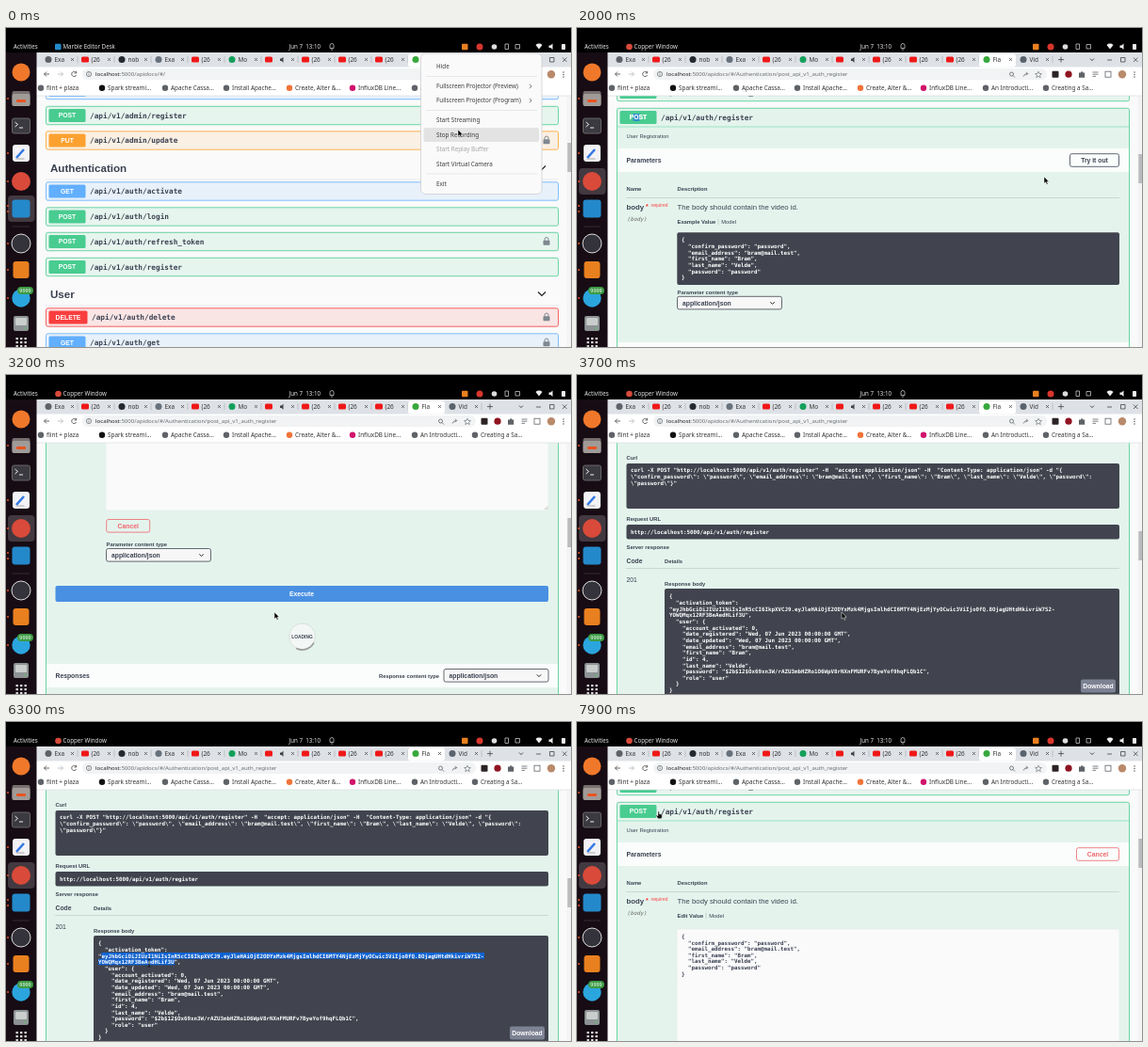
Animation of 600x339 px, one loop 8 s. Source, as an HTML page:

```html
<!DOCTYPE html>
<html lang="en">
<head>
<meta charset="utf-8">
<title>API docs walkthrough</title>
<style>
html, body { margin: 0; width: 100%; height: 100%; overflow: hidden; background: #000; }
svg { display: block; width: 100vw; height: 100vh; }
text { white-space: pre; font-family: "Liberation Sans", Arial, sans-serif; }
.ui { font-family: "Noto Sans", "Open Sans", sans-serif; }
.mono { font-family: "DejaVu Sans Mono", monospace; }
.b { font-weight: 700; }
.m { font-weight: 500; }
.i { font-style: italic; }
.mid { text-anchor: middle; }

/* 1.25% of the loop is 100 ms */
.anim { animation: 8s step-end -20ms infinite; }
#menu, .first { animation-name: first; }
.later { animation-name: later; }
.closed { animation-name: closed; }
.open { animation-name: open; }
.view { animation-name: view; }
.edit { animation-name: edit; }
.load { animation-name: load; }
.done { animation-name: done; }
#picked { animation-name: picked; }
#reply { animation-name: reply; }
#doc { animation-name: scroll; animation-timing-function: steps(5); }
#thumb { animation-name: thumb; animation-timing-function: steps(5); }
#mouse { animation-name: mouse; animation-timing-function: steps(5); }
#arrow { animation-name: arrow; }
#beam { animation-name: beam; }
#hand { animation-name: hand; }
#ring { animation-name: spin; animation-duration: 1s; animation-timing-function: steps(10); }
.sel { transform-box: fill-box; transform-origin: right; }
#sel1 { animation-name: sel1; animation-timing-function: steps(3); }
#sel2 { animation-name: sel2; animation-timing-function: steps(2); }

@keyframes first { 0% { opacity: 1 } 1.25%, 100% { opacity: 0 } }
@keyframes later { 0% { opacity: 0 } 1.25%, 100% { opacity: 1 } }
@keyframes closed { 0% { opacity: 1 } 7.5%, 100% { opacity: 0 } }
@keyframes open { 0% { opacity: 0 } 7.5%, 100% { opacity: 1 } }
@keyframes view { 0% { opacity: 0 } 7.5% { opacity: 1 } 28.75%, 100% { opacity: 0 } }
@keyframes edit { 0% { opacity: 0 } 28.75%, 100% { opacity: 1 } }
@keyframes load { 0% { opacity: 0 } 37.5% { opacity: 1 } 42.5%, 100% { opacity: 0 } }
@keyframes done { 0% { opacity: 0 } 42.5%, 100% { opacity: 1 } }
@keyframes picked { 0% { opacity: 0 } 7.5% { opacity: 1 } 57.5%, 100% { opacity: 0 } }
@keyframes reply { 0% { transform: none } 37.5% { transform: translateY(46px) } 42.5%, 100% { transform: none } }
@keyframes arrow {
  0% { opacity: 1 } 6.25% { opacity: 0 } 8.75% { opacity: 1 } 27.5% { opacity: 0 } 30% { opacity: 1 }
  55% { opacity: 0 } 87.5% { opacity: 1 } 95%, 100% { opacity: 0 }
}
@keyframes beam { 0% { opacity: 0 } 55% { opacity: 1 } 87.5%, 100% { opacity: 0 } }
@keyframes hand {
  0% { opacity: 0 } 6.25% { opacity: 1 } 8.75% { opacity: 0 } 27.5% { opacity: 1 } 30% { opacity: 0 }
  95%, 100% { opacity: 1 }
}
@keyframes spin { to { transform: rotate(360deg) } }
@keyframes sel1 {
  0%, 59.9% { transform: scaleX(0) }
  60% { transform: scaleX(.8) }
  63.75%, 100% { transform: none }
}
@keyframes sel2 { 0%, 57.5% { transform: scaleX(0) } 60%, 100% { transform: none } }
@keyframes scroll {
  0%, 7.5% { transform: translateY(0) }
  13.75%, 16.25% { transform: translateY(-58px) }
  22.5%, 30% { transform: translateY(-159px) }
  36.25%, 40% { transform: translateY(-370px) }
  46.25%, 88.75% { transform: translateY(-585px) }
  95%, 100% { transform: translateY(-159px) }
}
@keyframes thumb {
  0%, 7.5% { transform: translateY(122px) }
  13.75%, 16.25% { transform: translateY(123px) }
  22.5%, 30% { transform: translateY(134px) }
  36.25%, 40% { transform: translateY(152px) }
  46.25%, 88.75% { transform: translateY(166px) }
  95%, 100% { transform: translateY(124px) }
}
@keyframes mouse {
  0%, 1.25% { transform: translate(480px, 108px) }
  6.25%, 8.75% { transform: translate(66px, 253px) }
  13.75%, 18.75% { transform: translate(340px, 188px) }
  25% { transform: translate(496px, 158px) }
  27.5%, 30% { transform: translate(545px, 140px) }
  36.25%, 37.5% { transform: translate(300px, 230px) }
  40% { transform: translate(285px, 252px) }
  46.25%, 50% { transform: translate(281px, 252px) }
  56.25%, 57.5% { transform: translate(182px, 255px) }
  63.75%, 66.25% { transform: translate(101px, 249px) }
  76.25%, 87.5% { transform: translate(152px, 256px) }
  96.25%, 100% { transform: translate(86px, 95px) }
}
</style>
</head>
<body>
<svg viewBox="0 0 600 339" preserveAspectRatio="none">
  <rect width="600" height="339" fill="#fafafa"/>
  <g id="doc" class="anim"></g>
  <g id="browser"></g>
  <g id="desktop"></g>
  <g id="menu" class="anim"></g>
  <g id="mouse" class="anim">
    <path id="arrow" class="anim" d="M0 0V7.2L1.7 5.7L2.9 8.3L4.1 7.7L3 5.2H5.2Z" fill="#000" stroke="#fff" stroke-width=".5"/>
    <path id="beam" class="anim" d="M-1.5 -4H1.5M0 -4V4M-1.5 4H1.5" stroke="#111" stroke-width=".8"/>
    <path id="hand" class="anim" d="M0 0h1.3v2.6l3 .7v2.6l-.8 1.8H0L-2 4.6l.6 -.7L0 4.7Z" fill="#111" stroke="#fff" stroke-width=".4"/>
  </g>
</svg>
<script>
const INK = '#3b4151', GREEN = '#49cc90', DARK = '#41444e', CANCEL = '#f0646a';
const COLORS = { GET: '#61affe', POST: GREEN, PUT: '#fca130', DELETE: '#f93e3e' };

// y is the vertical middle of the text
const text = (x, y, s, size, cls = '', fill = INK) =>
  `<text x="${x}" y="${y + size * .36}" font-size="${size}" class="${cls}" fill="${fill}">${s}</text>`;
const box = (x, y, w, h, fill, more = '') =>
  `<rect x="${x}" y="${y}" width="${w}" height="${h}" fill="${fill}" ${more}/>`;
const dot = (x, y, r, fill, more = '') => `<circle cx="${x}" cy="${y}" r="${r}" fill="${fill}" ${more}/>`;
const line = (d, color = INK, w = .8) => `<path d="${d}" fill="none" stroke="${color}" stroke-width="${w}"/>`;
const group = (cls, body, dy = 0) => `<g transform="translate(0 ${dy})"><g class="anim ${cls}">${body}</g></g>`;
const put = (id, ...parts) => { document.getElementById(id).innerHTML = parts.join(''); };

const lock = y => box(570.5, y - 1.2, 7, 5, '#7f8790', 'rx=".8"') + line(`M572 ${y - 1}V${y - 2.5}a2 2 0 0 1 4 0V${y - 1}`, '#7f8790', 1);
const chevron = (x, y, s = 4, w = 1.2) => line(`M${x - s} ${y - s / 2}L${x} ${y + s / 2}L${x + s} ${y - s / 2}`, '#222', w);

function opHead(y, method, path, locked) {
  const wide = method === 'DELETE' ? 41 : 39;
  return box(45.5, y - 7, wide, 14, COLORS[method], 'rx="1.5"')
    + text(45.5 + wide / 2, y, method, 6.8, 'b mid', '#fff')
    + text(wide + 50, y, path, 7.76, 'mono b') + (locked ? lock(y) : '');
}
function row(y, method, path, locked) {
  const c = COLORS[method];
  return box(42.5, y - 9.7, 544, 19.4, c, `fill-opacity=".11" stroke="${c}" stroke-width=".8" rx="2"`) + opHead(y, method, path, locked);
}
const heading = (y, s) => text(47, y, s, 11.6, 'b') + chevron(569, y)
  + line(`M42 ${y + 12.5}H587`, '#d8dade', .5);
const button = (x, y, w, s, color) =>
  box(x, y, w, 13.6, 'none', `rx="2" stroke="${color}" stroke-width=".8"`) + text(x + w / 2, y + 6.8, s, 6.8, 'b mid', color);
const select = (x, y) => box(x, y, 111, 13.6, '#f7f7f7', `rx="2" stroke="${DARK}" stroke-width=".8"`)
  + text(x + 5.5, y + 6.8, 'application/json', 6.8, 'b') + chevron(x + 101, y + 7, 2.2, 1);
const responses = y => box(43, y, 543, 25, '#fff', 'fill-opacity=".8"') + text(52.5, y + 12.5, 'Responses', 6.8, 'b')
  + text(396, y + 12.5, 'Response content type', 5.82, 'b') + select(465, y + 5.5);
const code = (x, y, lines, fill = '#fff') =>
  lines.map((s, i) => text(x, y + i * 6.65, s, 5.82, 'mono b', fill)).join('');
const panel = (x, y, w, h) => box(x, y, w, h, DARK, 'rx="2"');
const valueTabs = (name, x) => text(106.5, 206, name, 5.82, 'b')
  + line(`M${x} 203V209`, '#999', .4) + text(x + 3.2, 206, 'Model', 5.82);

const sample = ['{', '  "confirm_password": "password",', '  "email_address": "bram@mail.test",',
  '  "first_name": "Bram",', '  "last_name": "Velde",', '  "password": "password"', '}'];
const curl = ['curl -X POST "http://localhost:5000/api/v1/auth/register" -H  "accept: application/json" -H  "Content-Type: application/json" -d "{',
  '\\"confirm_password\\": \\"password\\", \\"email_address\\": \\"bram@mail.test\\", \\"first_name\\": \\"Bram\\", \\"last_name\\": \\"Velde\\", \\"password\\":',
  '\\"password\\"}"'];
const answer = ['{', '  "activation_token":',
  '"eyJhbGciOiJIUzI1NiIsInR5cCI6IkpXVCJ9.eyJleHAiOjE2ODYxMzk4MjgsImlhdCI6MTY4NjEzMjYyOCwic3ViIjo0fQ.8OjagUHtdHkivriW7S2-',
  'YOWQMqx12RF3BeAedHLif3U",', '  "user": {', '    "account_activated": 0,',
  '    "date_registered": "Wed, 07 Jun 2023 00:00:00 GMT",', '    "date_updated": "Wed, 07 Jun 2023 00:00:00 GMT",',
  '    "email_address": "bram@mail.test",', '    "first_name": "Bram",', '    "id": 4,', '    "last_name": "Velde",',
  '    "password": "$2b$12$Ox69xn3W/rAZU3mbHZRo1O6WpV8rNXnFMURFv7ByeYof9hqFLQb1C",',
  '    "role": "user"', '  }', '}'];

const registerBlock =
  box(42.5, 85.3, 544, 800, GREEN, `fill-opacity=".12" stroke="${GREEN}" stroke-width=".8" rx="2"`)
  + opHead(95, 'POST', '/api/v1/auth/register')
  + `<g id="picked" class="anim">${box(59.5, 91, 7, 8, '#2f7de0', 'fill-opacity=".75"')}${text(65, 95, 'POST', 6.8, 'b mid', '#fff')}</g>`
  + line('M43 105H586', GREEN, .5)
  + text(52.5, 115.3, 'User Registration', 5.82)
  + box(43, 128, 543, 25, '#fff', 'fill-opacity=".8"') + text(52.5, 140.5, 'Parameters', 6.8, 'b')
  + text(52.5, 171, 'Name', 5.82, 'b') + text(106.5, 171, 'Description', 5.82, 'b')
  + line('M52 180.5H576', '#b5c4bf', .6)
  + text(52.5, 190, 'body', 7.76, 'b') + text(73, 189.5, '*', 7, 'b', '#f33') + text(78.5, 188.5, 'required', 4.9, '', '#f44')
  + text(53.5, 203, '(body)', 5.82, 'mono i', '#666')
  + text(106.5, 190, 'The body should contain the video id.', 7.76);

const viewBlock = button(523.5, 133.7, 52, 'Try it out', INK)
  + valueTabs('Example Value', 150)
  + panel(106.3, 217.3, 469.7, 55.7) + code(111, 225.2, sample)
  + text(106.5, 280.5, 'Parameter content type', 5.82, 'b') + select(106.5, 285.3) + responses(334);

const editBlock = button(530.5, 133.7, 45, 'Cancel', CANCEL)
  + valueTabs('Edit Value', 137)
  + box(106, 220, 470, 135, '#fafafb', 'stroke="#e3e9e6" stroke-width=".5" rx="2"') + code(111, 227.8, sample, INK);

const executeBlock = line('M572 143L575.5 139.5M574 143L575.5 141.5', '#888', .5)
  + button(106.7, 153.5, 46, 'Cancel', CANCEL)
  + text(106.5, 180, 'Parameter content type', 5.82, 'b') + select(106.5, 184.5)
  + box(52.5, 224, 523.5, 17, '#4990e2', 'rx="2"')
  + text(314, 232.5, 'Execute', 6.8, 'b mid', '#fff')
  + `<g id="reply" class="anim">${responses(261)}</g>`;

const loader = `<g transform="translate(314.5 278)">${dot(0, 0, 14, '#f3f7f5', 'stroke="#d5dfda" stroke-width="1"')}`
  + `<path id="ring" class="anim" d="M9.9 -9.9A14 14 0 0 1 9.9 9.9" fill="none" stroke="#777" stroke-width="1.2"/></g>`
  + text(314.5, 278, 'LOADING', 4.85, 'b mid');

const resultBlock =
  box(314, 9, 262, 17, '#f5f8f7', 'stroke="#888" stroke-width=".8" rx="2"') + box(52.5, 9, 262, 17, '#4990e2', 'rx="2"')
  + text(183, 17.5, 'Execute', 6.8, 'b mid', '#fff') + text(445, 17.5, 'Clear', 6.8, 'b mid')
  + text(52.5, 88, 'Curl', 5.82, 'b') + panel(52.5, 94, 523.5, 48) + code(57, 101.3, curl)
  + text(52.5, 152.5, 'Request URL', 5.82, 'b') + panel(52.5, 159, 523.5, 15.5)
  + code(57, 166.8, ['http://localhost:5000/api/v1/auth/register'])
  + text(52.5, 183, 'Server response', 5.82, 'b')
  + text(52.5, 198, 'Code', 6.8, 'b') + text(93, 198, 'Details', 5.82, 'b') + line('M52 205.5H576', '#b5c4bf', .6)
  + text(52.5, 217.5, '201', 6.8) + text(93, 221.5, 'Response body', 5.82, 'b')
  + panel(93, 227, 483, 114)
  + '<g fill="#0f62d2">' + '<rect id="sel1" class="anim sel" x="101.5" y="245" width="406.5" height="6.7"/>'
  + '<rect id="sel2" class="anim sel" x="98" y="251.6" width="81" height="6.7"/></g>'
  + code(98, 235.3, answer)
  + box(535, 323.5, 37, 14, '#7d8293', 'rx="2"') + text(553.5, 330.5, 'Download', 6.8, 'b mid', '#fff');

put('doc',
  row(66, 'GET', '/api/v1/admin/get'), row(93, 'POST', '/api/v1/admin/register'),
  row(119.5, 'PUT', '/api/v1/admin/update', true), heading(148.5, 'Authentication'),
  row(173.5, 'GET', '/api/v1/auth/activate'), row(200.5, 'POST', '/api/v1/auth/login'),
  row(227, 'POST', '/api/v1/auth/refresh_token', true),
  group('closed', row(254, 'POST', '/api/v1/auth/register') + heading(282.5, 'User')
    + row(307.5, 'DELETE', '/api/v1/auth/delete', true) + row(334.5, 'GET', '/api/v1/auth/get', true)),
  group('open', registerBlock, 159), group('view', viewBlock, 159), group('edit', editBlock, 159),
  group('edit', executeBlock, 370), group('load', loader, 370), group('done', resultBlock, 585));

const RED = '#f01818', GREY = '#5f6368';
const tabs = [['Exa', GREY], ['(26', RED], ['nob', '#24292e'], ['Exa', '#66717c'], ['(26', RED], ['Mo', '#13a05a'],
  ['(26', RED], ['(26', RED], ['(26', RED], ['(26', RED], ['Fla', '#37a83c'], ['Vid', '#59636e']];
const tab = ([name, color], n) => {
  const x = 45 + n * 39;
  const icon = color === RED ? box(x - 4, 30.6, 8, 6, RED, 'rx="1.5"') : dot(x, 33.6, 3.5, color);
  const speaker = n === 6 ? '<path d="M291 32.5h1.5l2-1.8v6l-2-1.8H291z" fill="#444"/>' : '';
  return (n === 10 ? box(x - 8, 27.5, 39, 14, '#fff', 'rx="3"') : line(`M${x + 31} 30V37`, '#9aa0a6', .5))
    + icon + speaker + (n === 6 ? '' : text(x + 6.5, 33.5, name, 6.4, 'ui', '#333'))
    + line(`M${x + 24} 32l3 3m0 -3l-3 3`, '#444', .7);
};
const marks = [[37, 'flint + plaza', GREY], [102, 'Spark streami...', '#111'], [169, 'Apache Cassa...', GREY], [234, 'Install Apache...', GREY],
  [301, 'Create, Alter &amp;...', '#f0743a'], [368, 'InfluxDB Line...', '#d1136c'], [434, 'An Introducti...', GREY], [498, 'Creating a Sa...', GREY]];
const url = path => text(95, 49, `localhost<tspan fill="#6a6e73">:5000/apidocs/#/${path}</tspan>`, 6.1, 'ui', '#202124');

put('browser',
  box(595.5, 72, 4.5, 267, '#f4f4f4'), box(596.3, 0, 3.7, 31, '#b9bbbd', 'id="thumb" class="anim"'),
  box(32, 26, 568, 16, '#dee1e6'), tabs.map(tab).join(''),
  line('M511 33.6h6m-3 -3v6', '#444'), chevron(547, 33.6, 2, .8),
  line('M563 34h5M577.5 31.5h4.5v4.5h-4.5zM591 31.5l4.5 4.5m0 -4.5l-4.5 4.5', '#333', .7),
  box(32, 41.5, 568, 30.5, '#fff'), line('M32 72H600', '#d5d8dc', .6),
  box(81, 43, 418, 12, '#f1f3f4', 'rx="6"'),
  line('M46 49H40.5m2.5 -2.5l-2.5 2.5l2.5 2.5', '#444'), line('M55 49h5.5m-2.5 -2.5l2.5 2.5l-2.5 2.5', '#b2b5b8'),
  line('M74.5 47.5a2.6 2.6 0 1 0 .2 2.5m0 -4.2v2.2h-2.2', '#444'),
  dot(88, 49, 2.6, 'none', `stroke="${GREY}" stroke-width=".7"`), line('M88 48.5V50.5M88 47.1V47.8', GREY, .7),
  group('closed', url('')), group('open', url('Authentication/post_api_v1_auth_register')),
  dot(461.5, 49, 2, 'none', `stroke="${GREY}" stroke-width=".8"`), line('M463 50.5l2 2', GREY),
  line('M474 51.5q1 -3 4.5 -3m-1.5 -1.7l1.7 1.7l-1.7 1.7', GREY),
  line('M490 46.2l1 2.2l2.4 .2l-1.8 1.6l.6 2.4l-2.2 -1.3l-2.2 1.3l.6 -2.4l-1.8 -1.6l2.4 -.2z', GREY, .6),
  box(504.5, 45.7, 7, 7, '#2b2324', 'rx="1"'), dot(522, 49.2, 3.6, '#8f1420'),
  '<path d="M533 47.5h2a1.2 1.2 0 0 1 2.4 0h1.8v5.3H533z" fill="#5f6368"/>', line('M547.5 47h6m-6 2.2h6m-6 2.2h3.5', GREY),
  box(561, 46.2, 6, 6, 'none', `stroke="${GREY}" stroke-width=".8"`), dot(579, 49.2, 4.2, '#b98a6b'),
  [47, 49.5, 52].map(y => dot(592, y, .7, '#444')).join(''),
  marks.map(([x, s, c]) => dot(x, 63.7, 3.2, c) + text(x + 6, 63.6, s, 6.35, 'ui', '#333')).join(''));

const running = [75, 133, 163, 189, 195, 229, 257, 287].map(y => dot(2, y, 1, '#e95420')).join('');
const current = y => box(2, y - 14, 28.5, 28, '#5a5157', 'rx="4" fill-opacity=".65"');
const grid = [0, 1, 2, 3, 4, 5, 6, 7, 8].map(i => box(10.5 + i % 3 * 4.5, 329 + (i / 3 | 0) * 4, 2.4, 2.2, '#ddd')).join('');
const label = (x, s) => text(x, 20, s, 6.2, 'ui m', '#e4e4e4');

put('desktop',
  box(0, 0, 600, 26, '#000'), box(0, 26, 32.5, 313, '#170c14'),
  group('first', current(192) + label(60.5, 'Marble Editor Desk') + box(52, 16.7, 6.5, 6.5, '#2489ca', 'rx="1"')),
  group('later', current(163) + label(60.5, 'Copper Window') + dot(55.5, 20, 3.3, '#d94a3a')),
  running, label(8, 'Activities'), label(300.5, 'Jun 7  13:10'),
  line('M344 21.5v-3a2 2 0 0 1 4 0v3zM345 23h2', '#ddd', .7),
  box(484, 16.7, 6.5, 6.5, '#e9801f', 'rx="1"'), dot(503, 20, 3.5, '#d8362c'), dot(518.5, 20, 2.8, '#ddd'),
  line('M530 17v5.5h3.5V17zM541 17.5h4.5v4.5H541z', '#ddd', .7),
  '<path d="M562.5 18a5 5 0 0 1 7 0l-3.5 4.5z" fill="#eee"/><path d="M576.5 18.5h1.8l2.2 -2v6.5l-2.2 -2h-1.8z" fill="#eee"/>',
  box(590, 17, 4, 6, '#eee', 'rx=".8"'),
  dot(16, 47, 9.5, '#f0782a'),
  box(6.5, 67, 19, 16, '#77706f', 'rx="2"'), box(6.5, 70, 19, 13, '#a19b98', 'rx="2"'), box(11, 76, 10, 3, '#e95420', 'rx="1"'),
  box(6.5, 96, 19, 16, '#3b3a40', 'rx="2" stroke="#777" stroke-width=".8"'), line('M9.5 100l3 2.5l-3 2.5M14 106h4', '#eee', 1),
  box(7, 124, 18, 18, '#f3f3f5', 'rx="3"'), line('M11 138l8 -9', '#3478e5', 2.6), line('M10.5 139h9', '#999', .8),
  dot(16, 163, 10, '#d94a3a'), box(6.5, 182.5, 19, 19, '#2489ca', 'rx="3"'),
  line('M7 211H25', '#544b50', .5), dot(16, 229, 10, '#34323a', 'stroke="#ddd" stroke-width="1"'),
  box(7.5, 248, 17, 18, '#e9801f', 'rx="3"'), dot(16, 287, 9.7, '#2ba5de'),
  box(12, 275, 17, 8, '#3d9c45', 'rx="4"'), text(20.5, 279, '9999', 5.4, 'ui mid', '#fff'),
  box(8, 306, 16, 16, '#8d9394', 'rx="2"'), box(10, 308, 12, 8, '#c9cdcc', 'rx="1"'), dot(20.5, 319, 1, '#5ec06b'), grid);

const items = [[41, 'Hide'], [62, 'Fullscreen Projector (Preview)'], [77, 'Fullscreen Projector (Program)'], [98, 'Start Streaming'],
  [113.5, 'Stop Recording'], [129, 'Start Replay Buffer', '#a5a5a5'], [144.5, 'Start Virtual Camera'], [165.5, 'Exit']];
put('menu',
  box(440.5, 27, 128.5, 149.5, '#fafafa', 'rx="5" stroke="#c9c9c9" stroke-width=".7"'),
  box(443.5, 106, 122.5, 15, '#e3e3e3', 'rx="2"'),
  [51.5, 87.5, 155].map(y => line(`M446 ${y}H564`, '#dcdcdc', .6)).join(''),
  [62, 77].map(y => line(`M556 ${y - 2.2}l2.2 2.2l-2.2 2.2`, '#555', .8)).join(''),
  items.map(([y, s, c = '#3d3d3d']) => text(457, y, s, 6.3, 'ui', c)).join(''));
</script>
</body>
</html>
```
